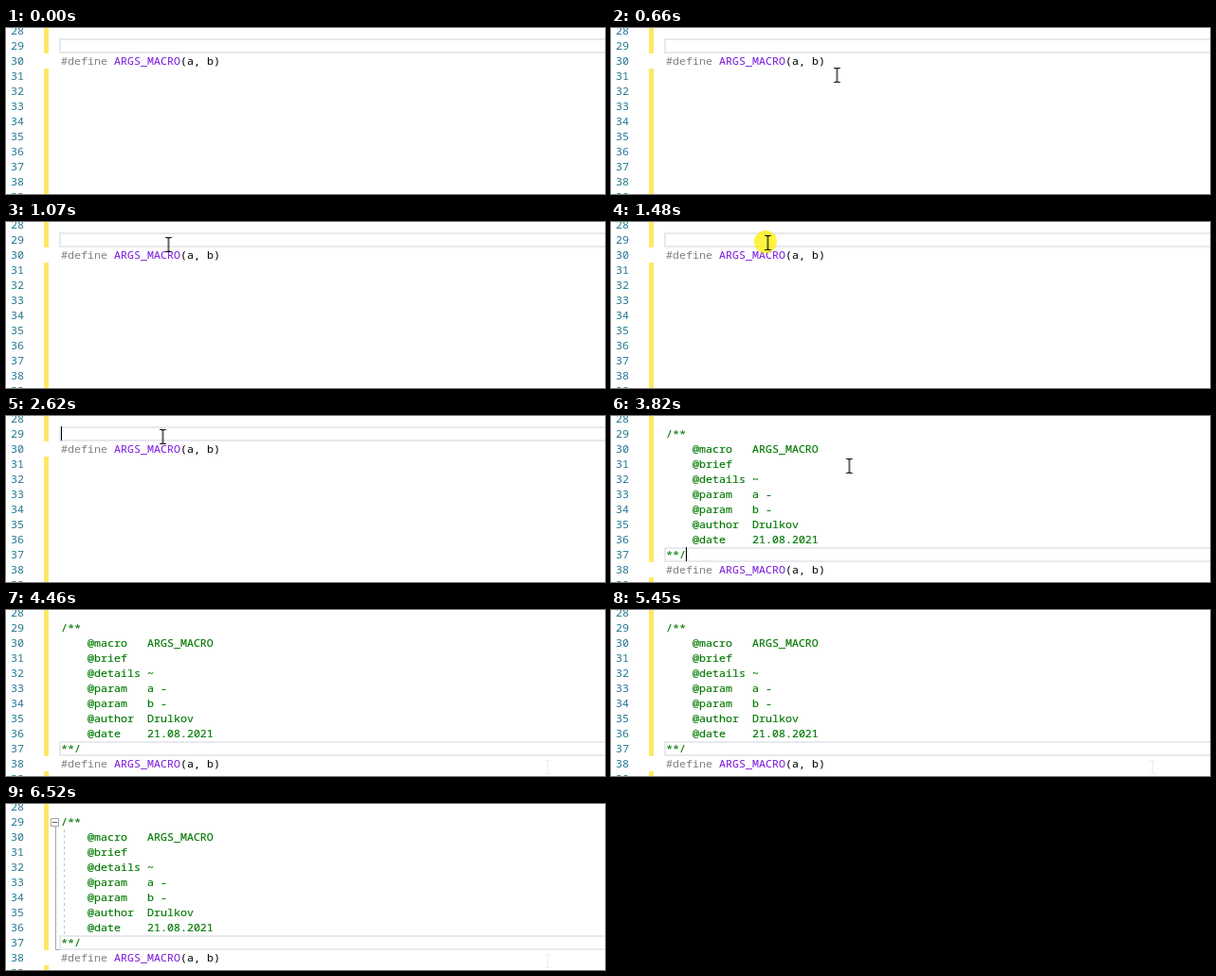
Recreate the animation shown at these times as an HTML page. Size 632x176 px, loop 6.8 s.

```html
<!DOCTYPE html>
<html lang="en">
<head>
<meta charset="utf-8">
<title>Macro comment template</title>
<style>
  html, body { margin: 0; width: 100%; height: 100%; overflow: hidden; background: #fff; }
  svg { display: block; width: 632px; height: 176px; }
  text { font: 11.667px "Noto Sans Mono", "DejaVu Sans Mono", monospace; white-space: pre; }
  .number { fill: #237893; }
  .directive { fill: #808080; }
  .macro { fill: #7a18dd; }
  .comment { fill: #007800; stroke: #007800; stroke-width: .15; }
  .changed { fill: #ffe866; }
  .current { fill: none; stroke: #e8e8ef; stroke-width: 2; }
  .outline { fill: none; stroke: #a5a5a5; }
  .minus { stroke: #606060; }
  .guide { stroke: #c4c4c4; stroke-dasharray: 3 3; }
  .click { fill: #fff000; fill-opacity: .75; }
  .beam { fill: none; stroke: #000; stroke-width: 1.2; }
  #trace { stroke: #eee; }
</style>
</head>
<body>
<svg viewBox="0 0 632 176">
  <g id="numbers"></g>
  <g id="before">
    <path class="changed" d="M40 0h5v27h-5zM40 43h5v133h-5z"/>
    <rect class="current" x="57" y="12" width="600" height="14"/>
  </g>
  <g id="after">
    <path class="changed" d="M40 0h5v155h-5zM40 171h5v5h-5z"/>
    <rect class="current" x="57" y="140" width="600" height="14"/>
  </g>
  <g id="fold">
    <path class="outline" d="M47.5 15.5h8v8h-8zM52.5 24v130.500h4"/>
    <path class="minus" d="M49 19.500h5"/>
    <path class="guide" d="M61.500 27v112"/>
  </g>
  <rect id="caretTop" x="58" y="11" width="1" height="15"/>
  <rect id="caretEnd" x="79" y="139" width="1" height="15"/>
  <circle id="click" class="click" cx="163" cy="21" r="12"/>
  <path id="trace" class="beam" d="M568.500 159.500h2l1 1 1-1h2M571.500 160v13M568.500 173.500h2l1-1 1 1h2"/>
  <path id="pointer" class="beam" d="M-3.300-7.500h2.300l1 1 1-1h2.300M0-7v14M-3.300 7.500h2.300l1-1 1 1h2.300"/>
</svg>
<script>
const LOOP = 6800;
const byId = id => document.getElementById(id);
const baseline = line => 23 + (line - 29) * 16;
const percent = ms => (ms / LOOP * 100).toFixed(3) + '%';
const rules = [];

function addLine(group, line, kind, content, x = 58) {
  byId(group).insertAdjacentHTML('beforeend',
    `<text class="${kind}" x="${x}" y="${baseline(line)}">${content}</text>`);
}

// Each frame is [ms, declarations] and holds until the next one.
function animate(id, frames) {
  const body = frames.map(([ms, css]) => `${percent(ms)}{${css}}`).join('');
  rules.push(`@keyframes ${id}{${body}}`,
    `#${id}{animation:${id} ${LOOP}ms step-end infinite}`);
}

// Shows the element during each [from, to) span.
function show(id, ...spans) {
  const frames = [[0, 'visibility:hidden']];
  for (const [from, to] of spans) {
    if (from === 0) frames.pop();
    frames.push([from, 'visibility:visible']);
    frames.push([to, `visibility:${to < LOOP ? 'hidden' : 'visible'}`]);
  }
  animate(id, frames);
}

for (let n = 28; n <= 39; n++) addLine('numbers', n, 'number', n, 5);

const define = '<tspan class="directive">#define</tspan> ' +
  '<tspan class="macro">ARGS_MACRO</tspan>(a, b)';
addLine('before', 30, 'code', define);
addLine('after', 38, 'code', define);

const tags = [
  ['macro', 'ARGS_MACRO'], ['brief', ''], ['details', '~'], ['param', 'a -'],
  ['param', 'b -'], ['author', 'Drulkov'], ['date', '21.08.2021']
];
const comment = ['/**', ...tags.map(([tag, value]) => `    @${tag.padEnd(8)}${value}`), '**/'];
comment.forEach((row, i) => addLine('after', 29 + i, 'comment', row));

show('before', [0, 2820]);
show('after', [2820, LOOP]);
show('fold', [5650, LOOP]);
show('click', [1410, 1620]);
show('caretTop', [1550, 2080], [2620, 2820]);
show('caretEnd', [2820, 3280], [3820, 4390], [4920, 5450], [5980, 6520]);
show('trace', [4390, LOOP]);

const place = (x, y) => `visibility:visible;transform:translate(${Math.floor(x) + .5}px,${Math.round(y)}px)`;
const mix = (a, b, u) => a + (b - a) * u;
const path = [[0, 'visibility:hidden']];
for (let k = 0; k <= 10; k++) {
  const u = 1 - (1 - k / 10) ** 3.3;
  path.push([390 + 67 * k, place(mix(535, 171, u), mix(162, 24, u))]);
}
path.push([1270, place(168, 23)], [1340, place(165, 22)]);
for (let k = 1; k <= 10; k++) {
  const u = k / 10, eased = u * u * (3 - 2 * u);
  path.push([3539 + 71 * k, place(mix(165, 565, eased), mix(22, 164, eased))]);
}
path.push([4320, place(571, 167)], [4390, place(583, 172)],
  [4460, 'visibility:hidden'], [LOOP, 'visibility:hidden']);
animate('pointer', path);

document.head.appendChild(document.createElement('style')).textContent = rules.join('\n');
</script>
</body>
</html>
```
